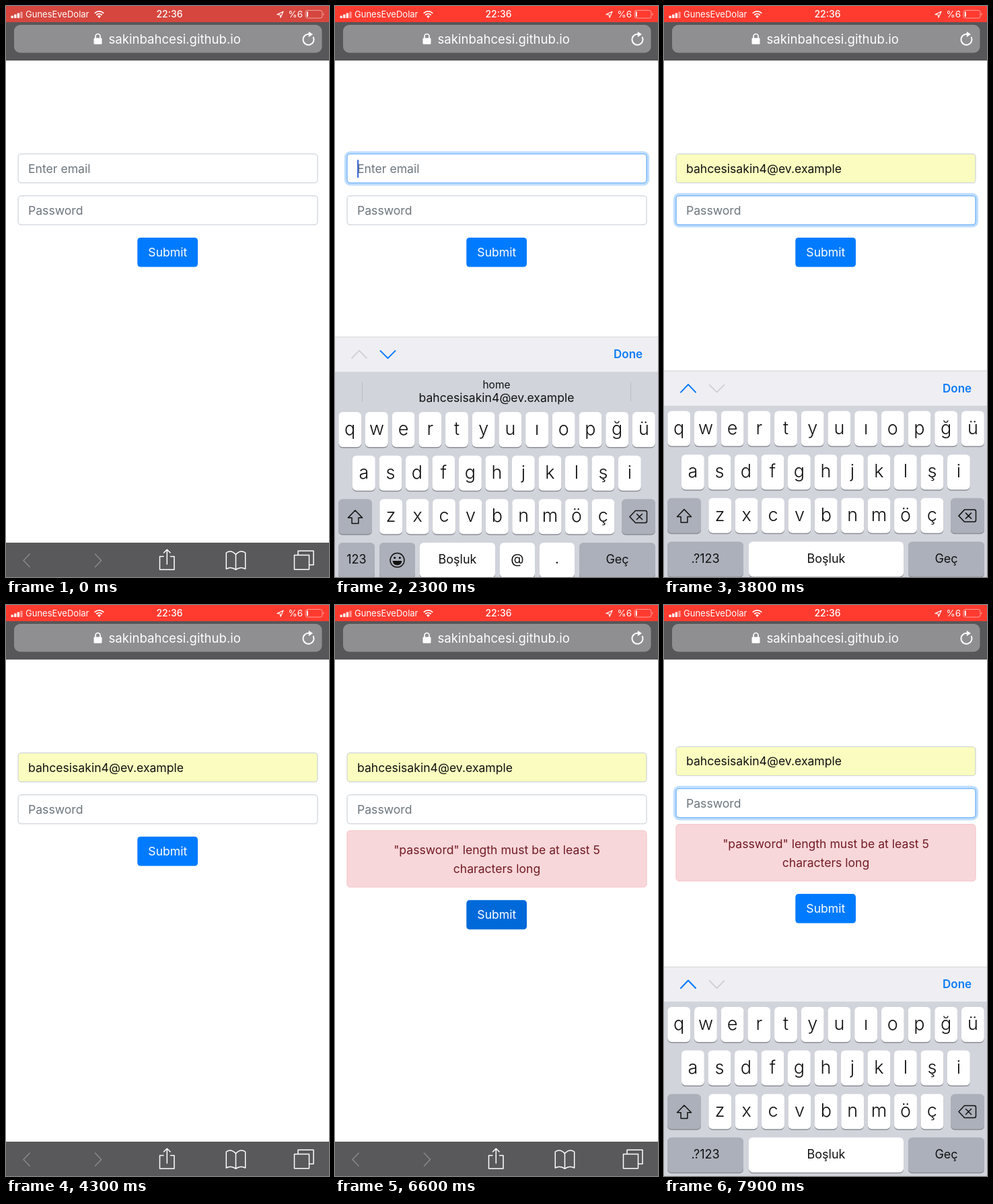
Animation, 480 px wide and 848 px high, one loop 8 s. Source, as an HTML page:

```html
<!DOCTYPE html>
<html lang="tr">
<head>
<meta charset="utf-8">
<title>Login form</title>
<style>
  html, body { margin: 0; width: 100%; height: 100%; overflow: hidden; background: #fff; }
  svg { display: block; width: 100vw; height: 100vh; }
  text { font-family: Inter, "Open Sans", sans-serif; font-size: 17.6px; }
  .line { fill: none; stroke-linecap: round; stroke-linejoin: round; }
</style>
</head>
<body>
<svg id="stage" viewBox="0 0 480 848"></svg>
<script>
const LOOP = 8000, STEP = 100;
const EMAIL = "bahcesisakin4@ev.example";
const HOST = "sakinbahcesi.github.io";
const stage = document.getElementById("stage");
const $ = id => document.getElementById(id);

const rect = (x, y, w, h, fill, r = 0, more = "") =>
  `<rect x="${x}" y="${y}" width="${w}" height="${h}" rx="${r}" fill="${fill}" ${more}/>`;
const text = (x, y, label, fill = "#111", more = "") =>
  `<text x="${x}" y="${y}" fill="${fill}" ${more}>${label}</text>`;
const mid = (x, y, label, fill, more = "") =>
  text(x, y, label, fill, `text-anchor="middle" ${more}`);
const line = (d, color, width = 1.5, more = "") =>
  `<path class="line" d="${d}" stroke="${color}" stroke-width="${width}" ${more}/>`;
const shape = (d, fill) => `<path d="${d}" fill="${fill}"/>`;
const group = (id, body, more = "") => `<g id="${id}" ${more}>${body}</g>`;

function statusBar() {
  const bars = [0, 1, 2, 3].map(i =>
    rect(7.5 + i * 4.6, 14.5 - i * 2, 3.4, 3.5 + i * 2, "#fff", 0.8, i > 2 ? 'opacity=".45"' : "")).join("");
  const wifi = line("M132.3 10.3a9 9 0 0 1 12.4 0M134.8 13a5.4 5.4 0 0 1 7.4 0", "#fff", 1.8)
    + shape("M138.5 18l-2.4-2.7a3.4 3.4 0 0 1 4.8 0z", "#fff");
  return rect(0, 0, 480, 24, "#ff3b30", 0, 'id="status"') + bars + wifi
    + text(29, 17, "GunesEveDolar", "#fff", 'style="font-size:13px"')
    + mid(243, 17.3, "22:36", "#fff", 'style="font-size:14px;font-weight:500"')
    + line("M403 12.6L412 8.2L408 17.2L407.3 13z", "#fff", 1.2)
    + text(419.5, 17, "%6", "#fff", 'style="font-size:13.5px"')
    + rect(445, 6.5, 25, 11.5, "none", 3, 'stroke="#fff" stroke-opacity=".5"')
    + rect(446.8, 8.2, 2, 8, "#fff", 0.8)
    + shape("M471.5 10.2q2.2 2 0 4z", "#ffb1ac");
}

function addressBar() {
  return rect(0, 24, 480, 57, "#575658") + rect(12, 28, 457.5, 41.5, "#8f8e90", 9)
    + rect(130.5, 47.5, 12, 9.3, "#fff", 1.3)
    + line("M133 48v-3a3.5 3.5 0 0 1 7 0v3", "#fff", 1.7)
    + text(152.5, 55.5, HOST, "#fff", 'style="font-size:18.6px"')
    + line("M456.8 46.5A8 8 0 1 1 450 41.8", "#fff", 1.9)
    + shape("M449.8 38l6.2 4-6.2 4.2z", "#fff");
}

function bottomBar() {
  return rect(0, 797, 480, 51, "#59585a")
    + line("M35 814l-9 9.5 9 9.5M132.5 814l9 9.5-9 9.5", "#878688", 1.7)
    + line("M234 817.5h-5.5v19.5h21.5v-19.5h-5.5M239.3 829v-21.5M234.5 812l4.8-4.8 4.8 4.8", "#fff")
    + line("M341.5 814.5q-7-7.5-14.2-2.5v24q7.2-4 14.2 1.2q7-5.2 14.2-1.2v-24q-7.2-5-14.2 2.5v22.5", "#fff")
    + line("M434 815.5v-6.3h23v20.7h-6.5M428.5 815.5h22v21.3h-22z", "#fff");
}

function field(id, y, hint, value = "") {
  const box = (dx, fill, more) => rect(18 - dx, y - dx, 445 + 2 * dx, 43 + 2 * dx, fill, 4.6 + dx, more);
  return box(0, "#fff", `id="${id}Box" stroke="#ced4da" stroke-width="1.2"`)
    + group(id + "Ring", box(0, "none", 'stroke="#80bdff" stroke-width="1.3"')
      + box(2.2, "none", 'stroke="#007bff" stroke-opacity=".25" stroke-width="3.7"'))
    + text(33, y + 28, hint, "#6c757d", `id="${id}Hint"`)
    + text(33, y + 28, value, "#111", `id="${id}Value"`)
    + rect(33, y + 8.5, 2.2, 27, "#426bd5", 1, `id="${id}Caret"`);
}

function page() {
  return field("email", 219.7, "Enter email", EMAIL) + field("pass", 281.8, "Password")
    + group("alert", rect(18, 335, 445, 84, "#f8d7da", 4.6, 'stroke="#f5c6cb" stroke-width="1.2"')
      + mid(240.5, 370, '"password" length must be at least 5', "#721c24")
      + mid(240.5, 398, "characters long", "#721c24"))
    + group("submit", rect(195.3, 344, 89.7, 43.5, "#007bff", 4.6, 'id="button"')
      + mid(240.3, 372.2, "Submit", "#fff"));
}

function key(x, row, w, label, size = 27, fill = "#fff") {
  const y = 597 + row * 64.6;
  const style = size > 20 ? `font-size:${size}px;font-weight:300` : `font-size:${size}px`;
  return rect(x, y + 1.5, w, 52, "#8b8e94", 6) + rect(x, y, w, 52, fill, 6)
    + mid(x + w / 2, y + (size > 20 ? 34 : 31.5), label, "#111", `style="${style}"`);
}

function keyboard() {
  const gray = "#abb0ba";
  const rows = [["qwertyuıopğü", 5.3, 39.7], ["asdfghjklşi", 26, 39.5], ["zxcvbnmöç", 66.3, 39.4]];
  const letters = rows.map(([chars, x, pitch], row) =>
    [...chars].map((c, i) => key(x + i * pitch, row, 33.8, c)).join("")).join("");
  const shift = key(5, 2, 50, "", 18, gray)
    + line("M30 743l10.5 10.8h-5.6v8.6h-9.8v-8.6h-5.6z", "#111");
  const erase = key(426, 2, 50, "", 18, gray)
    + line("M446.5 743.5h14.5q2.5 0 2.5 2.5v13q0 2.5-2.5 2.5h-14.5l-8.5-9zM448.5 748.5l8 8m0-8l-8 8", "#111");
  const smile = `<circle cx="92.5" cy="817" r="10.5" fill="none" stroke="#111" stroke-width="1.5"/>`
    + `<circle cx="88.7" cy="813.5" r="1.5"/><circle cx="96.3" cy="813.5" r="1.5"/>`
    + shape("M85.5 818h14q-1 6.5-7 6.5t-7-6.5z", "#111");
  const suggestions = line("M40.5 553v28M439.5 553v28", "#b9bcc3", 1)
    + mid(240, 561.8, "home", "#111", 'style="font-size:15.5px"')
    + mid(240, 582.3, EMAIL);
  const emailRow = key(5, 3, 54, "123", 18, gray) + key(66, 3, 53, "", 18, gray) + smile
    + key(126, 3, 112, "Boşluk", 18) + key(245, 3, 52, "@", 20) + key(304, 3, 52, ".", 20);
  const passRow = key(5, 3, 113, ".?123", 18, gray) + key(126, 3, 230, "Boşluk", 18);
  const up = "M25 569l11-11.5 11 11.5", down = "M67.5 558l11 11 11-11";
  const toolbar = rect(0, 537, 480, 52, "#efeff3") + rect(0, 537, 480, 1, "#d6d6da")
    + line(up + down, "#cfd0d5", 1.8)
    + line(up, "#007aff", 2, 'id="prev"') + line(down, "#007aff", 2, 'id="next"')
    + text(414, 569, "Done", "#0b7bf5", 'style="font-size:17px;font-weight:600"');
  return rect(0, 537, 480, 400, "#d1d4db")
    + group("toolbar", toolbar) + group("suggest", suggestions)
    + letters + shift + erase + group("emailRow", emailRow) + group("passRow", passRow)
    + key(363, 3, 113, "Geç", 18, gray);
}

stage.innerHTML = rect(0, 0, 480, 848, "#fff") + group("page", page())
  + bottomBar() + group("keyboard", keyboard()) + addressBar() + statusBar();

const ramp = (t, from, to) => Math.min(1, Math.max(0, (t - from) / (to - from)));
const within = (t, from, to) => t >= from && t < to;
const show = (id, on) => $(id).style.display = on ? "" : "none";
const fade = (id, value) => $(id).style.opacity = value;
const shiftY = (id, y) => $(id).setAttribute("transform", `translate(0 ${y})`);

// Critically damped spring, from 0 to 1
function spring(t, start) {
  const x = Math.max(0, t - start) * 0.0183;
  return 1 - (1 + x) * Math.exp(-x);
}

function draw(t) {
  const filled = t >= 2800, emailKeys = t < 2900, failed = t >= 4500;
  const rise = t < 3800 ? spring(t, 1970)
    : t < 6600 ? 1 - spring(t, 3790) : spring(t, 6690);
  const swap = ramp(t, 2950, 3150);

  $("status").setAttribute("fill", t < 100 ? "#d6463e" : "#ff3b30");
  shiftY("page", t > 6600 ? -9.2 * rise : 0);

  $("emailBox").setAttribute("fill", filled ? "#fafdbf" : "#fff");
  show("emailHint", !filled);
  show("emailValue", filled);
  fade("emailRing", ramp(t, 1970, 2120) - ramp(t, 3000, 3150));
  fade("passRing", ramp(t, 3000, 3150) - ramp(t, 3800, 3950) + ramp(t, 6700, 6850));
  show("emailCaret", within(t, 2200, 2800));
  show("passCaret", within(t, 3000, 3800) || within(t, 6900, 7500));

  show("alert", failed);
  shiftY("submit", failed ? 94.3 : 0);
  $("button").setAttribute("fill", within(t, 4400, 6700) ? "#0069d9" : "#007bff");

  show("keyboard", rise > 0.001);
  shiftY("keyboard", (1 - rise) * (emailKeys ? 363 : 311));
  shiftY("toolbar", emailKeys ? -52 : 0);
  for (const id of ["suggest", "emailRow"]) show(id, emailKeys);
  show("passRow", !emailKeys);
  fade("prev", swap);
  fade("next", 1 - swap);
}

const start = performance.now();
function tick() {
  const t = (performance.now() - start) % LOOP;
  draw(Math.floor(t / STEP) * STEP);
  requestAnimationFrame(tick);
}
draw(0);
requestAnimationFrame(tick);
</script>
</body>
</html>
```
